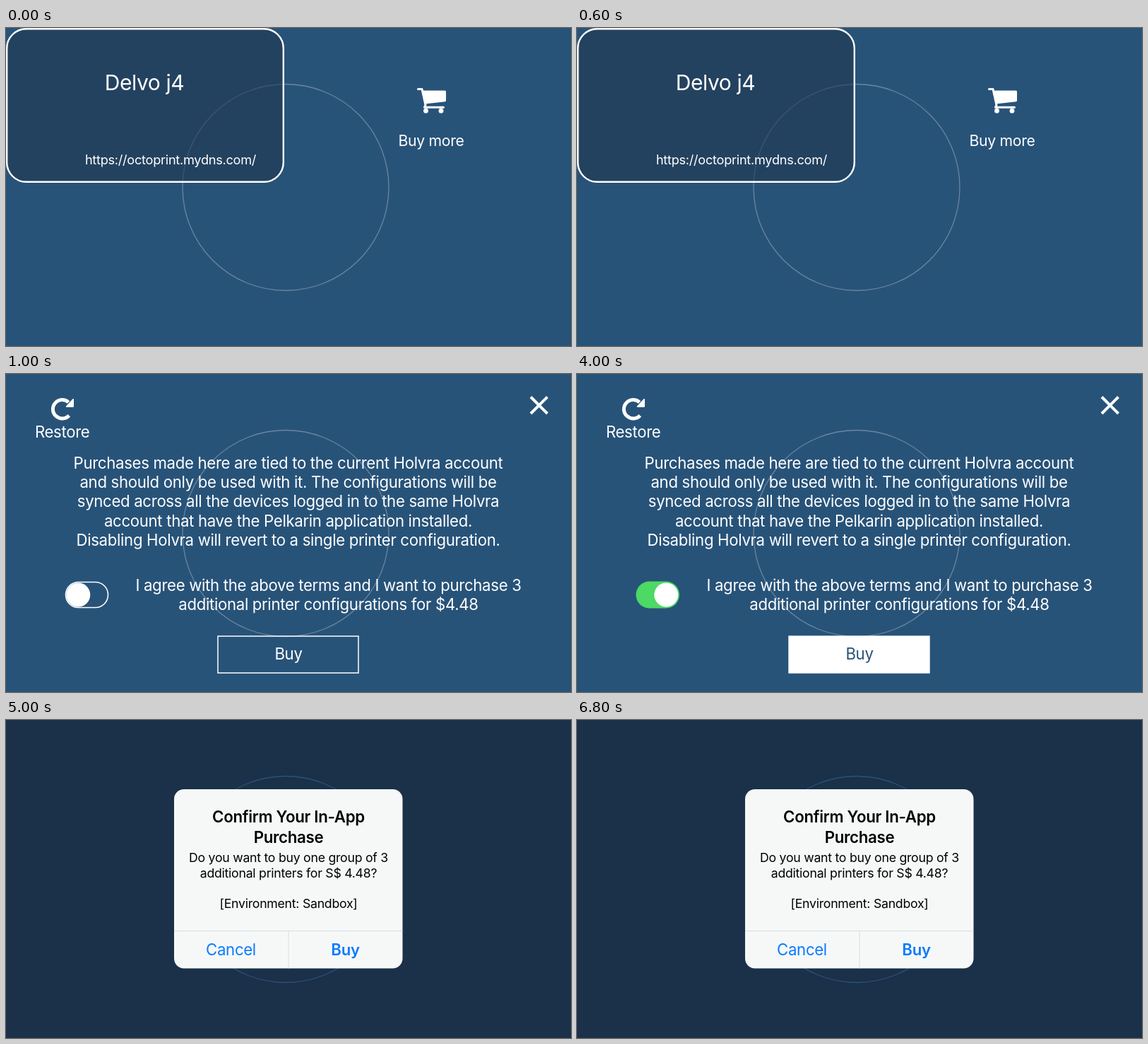
An HTML page that plays this animation: 800x450 px, repeating every 8000 ms.

```html
<!DOCTYPE html>
<html lang="en">
<head>
<meta charset="utf-8">
<title>Printer purchase</title>
<style>
html, body { margin: 0; width: 100%; height: 100%; overflow: hidden; background: #285379; }
svg { display: block; width: 800px; height: 450px; }
text {
  font: 400 22.2px Inter, "Open Sans", sans-serif;
  letter-spacing: -.0145em;
  text-anchor: middle;
  fill: #fff;
}
.title { font-size: 30px; }
.url { font-size: 18.15px; }
.more { font-size: 21.2px; }
.body text { font-size: 17.7px; fill: #000; }
.head text { font-size: 22.3px; font-weight: 600; fill: #000; }
.link { fill: #0a7aff; }
.strong { font-weight: 600; }
.line { fill: none; stroke: #fff; }
.ring { fill: none; stroke: #6985a0; stroke-width: 1.3; }

/* Every screen is a hard cut within one shared 8 s loop */
.home, .terms, .off, .on, .alert { animation: 8s step-end infinite; visibility: hidden; }
.home { animation-name: home; }
.terms { animation-name: terms; }
.off { animation-name: off; }
.on { animation-name: on; }
.alert { animation-name: alert; }
@keyframes home { 0% { visibility: visible } 12.5%, 100% { visibility: hidden } }
@keyframes terms { 0% { visibility: hidden } 12.5% { visibility: visible } 62.5%, 100% { visibility: hidden } }
@keyframes off { 0% { visibility: hidden } 12.5% { visibility: visible } 50%, 100% { visibility: hidden } }
@keyframes on { 0% { visibility: hidden } 50% { visibility: visible } 62.5%, 100% { visibility: hidden } }
@keyframes alert { 0% { visibility: hidden } 62.5%, 100% { visibility: visible } }
</style>
</head>
<body>
<svg viewBox="0 0 800 450">
  <rect width="800" height="450" fill="#285379"/>
  <circle class="ring" cx="396" cy="225.5" r="146"/>

  <g class="home">
    <rect x="1.2" y="1.2" width="391.6" height="216.6" rx="27.5" fill="#20374f" fill-opacity=".6" stroke="#fff" stroke-width="2.4"/>
    <text class="title" x="196" y="88">Delvo j4</text>
    <text class="url" x="233" y="193">https://octoprint.mydns.com/</text>
    <g fill="#fff">
      <path d="M590 88.5H621.5Q623 88.5 623 90V102.5Q623 104 621.5 104.2L592.5 107.5Z"/>
      <path class="line" d="M583.5 86.5H589L594 109L592.5 112.2H619.5" stroke-width="3" stroke-linecap="round" stroke-linejoin="round"/>
      <circle cx="594.5" cy="117.2" r="3.4"/>
      <circle cx="616" cy="117.2" r="3.4"/>
    </g>
    <text class="more" x="602" y="167">Buy more</text>
  </g>

  <g class="terms">
    <path class="line" d="M88.5 40A13.2 13.2 0 1 0 89.3 58.7" stroke-width="5"/>
    <path d="M94.5 35.2Q96 34.4 96 36.2V45.8Q96 47 94.7 47H86Q84 46.8 85.2 45.3Z" fill="#fff"/>
    <text x="79.7" y="90">Restore</text>
    <path class="line" d="M743 32.5L766.5 56M766.5 32.5L743 56" stroke-width="4"/>
    <text x="399.5" y="134">Purchases made here are tied to the current Holvra account</text>
    <text x="399.5" y="161">and should only be used with it. The configurations will be</text>
    <text x="399.5" y="188">synced across all the devices logged in to the same Holvra</text>
    <text x="399.5" y="215.5">account that have the Pelkarin application installed.</text>
    <text x="399.5" y="242.5">Disabling Holvra will revert to a single printer configuration.</text>
    <text x="456.5" y="307">I agree with the above terms and I want to purchase 3</text>
    <text x="456.5" y="334">additional printer configurations for $4.48</text>
  </g>

  <g class="off">
    <rect class="line" x="84.5" y="294.5" width="60" height="36" rx="18" stroke-width="1.6"/>
    <circle cx="102.3" cy="312.5" r="17" fill="#fff"/>
    <rect class="line" x="300" y="371" width="199" height="52" stroke-width="1.5"/>
    <text x="400" y="404">Buy</text>
  </g>

  <g class="on">
    <rect x="83.5" y="293.5" width="61.5" height="38" rx="19" fill="#4cd964"/>
    <circle cx="126.3" cy="312.5" r="17" fill="#fff"/>
    <rect x="299.3" y="370.3" width="200.4" height="53.4" fill="#fff"/>
    <text x="400" y="404" style="fill:#285379">Buy</text>
  </g>

  <g class="alert">
    <rect width="800" height="450" fill="#1b3049"/>
    <circle class="ring" cx="396" cy="225.5" r="146" style="stroke:#28527a"/>
    <rect x="238" y="98" width="323.5" height="253.5" rx="14" fill="#f6f8f8"/>
    <path d="M238 298.5H561.5M400 298.5V351.5" fill="none" stroke="#d9dde0"/>
    <g class="head">
      <text x="400" y="145">Confirm Your In-App</text>
      <text x="400" y="174">Purchase</text>
    </g>
    <g class="body">
      <text x="400" y="201">Do you want to buy one group of 3</text>
      <text x="400" y="222.5">additional printers for S$ 4.48?</text>
      <text x="400" y="265.5">[Environment: Sandbox]</text>
    </g>
    <text class="link" x="318.5" y="333">Cancel</text>
    <text class="link strong" x="480.5" y="333">Buy</text>
  </g>
</svg>
</body>
</html>
```
